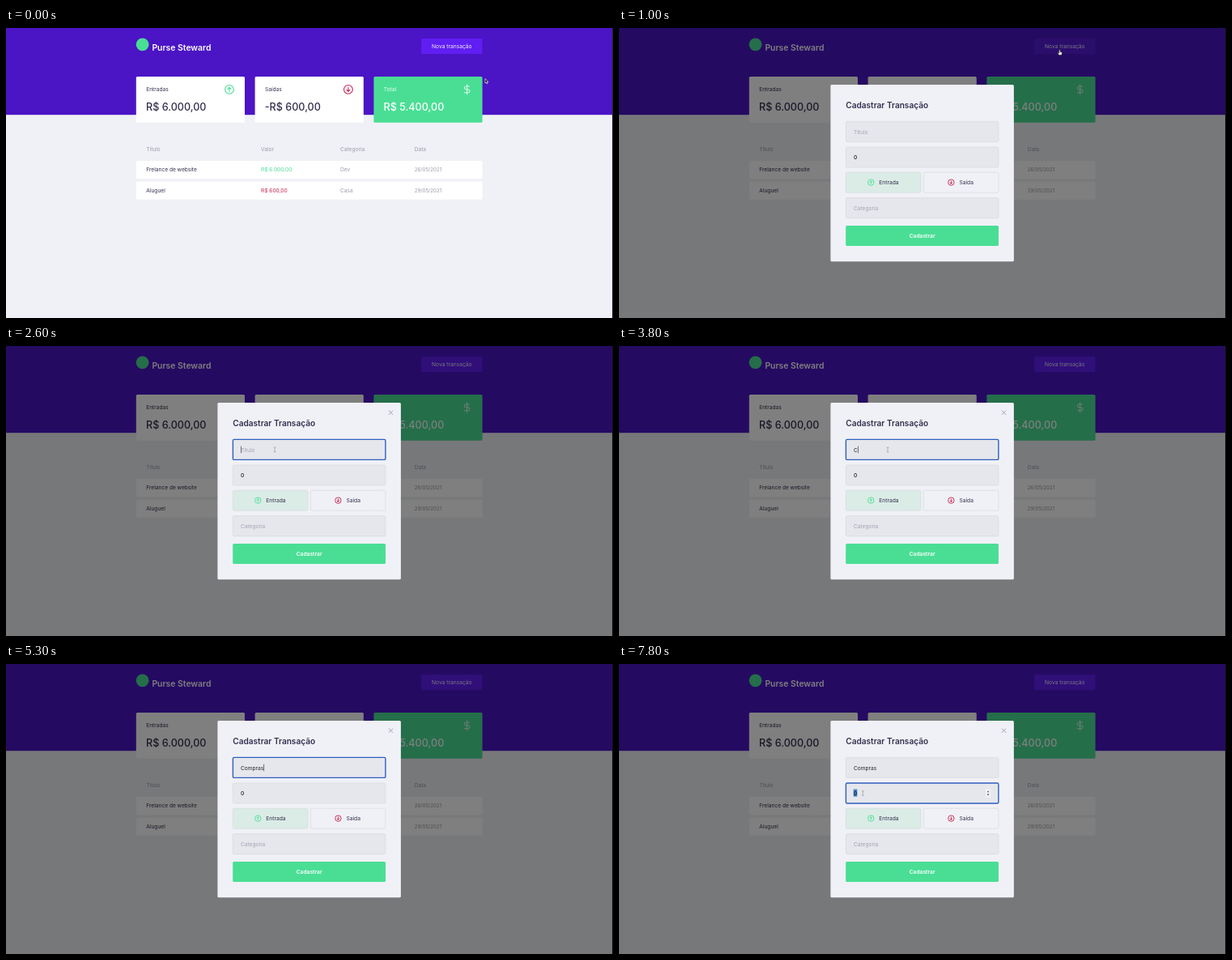
Animation of 750x358 px, one loop 8 s. Source, as an HTML page with a canvas:

```html
<!DOCTYPE html>
<html lang="pt-BR">
<head>
<meta charset="utf-8">
<title>Purse Steward</title>
<style>
  html, body { margin: 0; width: 100%; height: 100%; overflow: hidden; background: #f0f1f6; }
  canvas { display: block; width: 750px; height: 358px; }
</style>
</head>
<body>
<canvas id="stage"></canvas>
<script>
const W = 750, H = 358, LOOP = 8000, STEP = 100;
const C = {
  bg: '#f0f1f6', header: '#4b14c5', button: '#611ef2', hover: '#571bda',
  green: '#4ade95', red: '#c8214f', title: '#322f4f', body: '#9b9ba9',
  field: '#e6e7ec', line: '#d6d8dd', ink: '#23232b', focus: '#2f5fc0'
};
const canvas = document.getElementById('stage');
const ctx = canvas.getContext('2d');
const dpr = window.devicePixelRatio || 1;
canvas.width = W * dpr;
canvas.height = H * dpr;

function box(x, y, w, h, fill, r = 1.5, stroke, line = 0.7) {
  ctx.beginPath();
  ctx.roundRect(x, y, w, h, r);
  if (fill) { ctx.fillStyle = fill; ctx.fill(); }
  if (stroke) { ctx.strokeStyle = stroke; ctx.lineWidth = line; ctx.stroke(); }
}

function text(str, x, y, color, size = 6.6, weight = 400, align = 'left') {
  ctx.font = `${weight} ${size}px Inter, "Open Sans", sans-serif`;
  ctx.textAlign = align;
  ctx.fillStyle = color;
  ctx.fillText(str, x, y);
}

function textWidth(str, size = 6.6, weight = 400) {
  ctx.font = `${weight} ${size}px Inter, "Open Sans", sans-serif`;
  return ctx.measureText(str).width;
}

function path(d, x, y, scale, stroke, line, fill) {
  const p = new Path2D(d);
  ctx.save();
  ctx.translate(x, y);
  ctx.scale(scale, scale);
  ctx.lineCap = ctx.lineJoin = 'round';
  if (fill) { ctx.fillStyle = fill; ctx.fill(p); }
  if (stroke) { ctx.strokeStyle = stroke; ctx.lineWidth = line / scale; ctx.stroke(p); }
  ctx.restore();
}

// dir: -1 points up, 1 points down
function arrowIcon(x, y, r, dir, color, line) {
  ctx.beginPath();
  ctx.arc(x, y, r, 0, Math.PI * 2);
  ctx.strokeStyle = color;
  ctx.lineWidth = line;
  ctx.stroke();
  path(`M0 -5V5M-4 ${dir}L0 ${5 * dir}L4 ${dir}`, x, y, r / 11, color, line);
}

function card(x, label, value, fill, labelColor, valueColor) {
  box(x, 60, 134.2, 56.8, fill);
  text(label, x + 12.4, 78.3, labelColor);
  text(value, x + 12.2, 102.4, valueColor, 12.6, 500);
}

function row(y, name, value, color, category, date) {
  box(160.8, y, 427.8, 22.2, '#fff');
  const base = y + 13.3;
  text(name, 173.3, base, C.title);
  text(value, 315, base, color, 6.6);
  text(category, 413, base, C.body);
  text(date, 504.7, base, C.body, 6.2);
}

function page(hover) {
  ctx.fillStyle = C.bg;
  ctx.fillRect(0, 0, W, H);
  ctx.fillStyle = C.header;
  ctx.fillRect(0, 0, W, 107.2);

  ctx.beginPath();
  ctx.arc(168.6, 20.3, 7.9, 0, Math.PI * 2);
  ctx.fillStyle = C.green;
  ctx.fill();
  text('Purse Steward', 180.4, 28.4, '#fff', 10.4, 600);

  box(513.2, 13, 75.3, 18.9, hover ? C.hover : C.button);
  text('Nova transação', 550.8, 24.6, '#f3effc', 6.7, 400, 'center');

  card(160.8, 'Entradas', 'R$ 6.000,00', '#fff', C.title, C.title);
  arrowIcon(276, 75.9, 5.4, -1, C.green, 1.1);
  card(307.6, 'Saídas', '-R$ 600,00', '#fff', C.title, C.title);
  arrowIcon(422.9, 75.9, 5.4, 1, C.red, 1.1);
  card(454.4, 'Total', 'R$ 5.400,00', C.green, '#eafff3', '#fff');
  path('M0 -11V11M5 -7H-2.5A3.5 3.5 0 0 0 -2.5 0H2.5A3.5 3.5 0 0 1 2.5 7H-6', 569.7, 75.9, 0.55, '#f4fff9', 0.9);

  const heads = { 'Título': 173.3, 'Valor': 315, 'Categoria': 413, 'Data': 504.7 };
  for (const h in heads) text(h, heads[h], 151.8, C.body);
  row(164, 'Frelance de website', 'R$ 6.000,00', C.green, 'Dev', '26/05/2021');
  row(189.5, 'Aluguel', 'R$ 600,00', C.red, 'Casa', '29/05/2021');
  ctx.fillStyle = '#26242c';
  ctx.fillRect(749, 0, 1, H);
}

function field(y, value, placeholder, focused, weight) {
  box(280.4, y, 188.5, 25, C.field, 1.5, focused ? C.focus : C.line, focused ? 1.4 : 0.7);
  text(value || placeholder, 290, y + 15.1, value ? C.ink : '#a2a3b3', 6.6, weight);
}

function typeButton(x, label, dir, color, fill) {
  box(x, 178.2, 92.5, 25, fill, 1.5, C.line);
  arrowIcon(x + (dir < 0 ? 30.9 : 34), 190.6, 3.7, dir, color, 0.9);
  text(label, x + (dir < 0 ? 40.9 : 44), 193, C.title, 6.7);
}

function caret(x, y) {
  ctx.fillStyle = C.ink;
  ctx.fillRect(x, y - 4.2, 0.6, 8.6);
}

const typed = [[3700, 1], [4400, 2], [4600, 3], [4800, 4], [5100, 5], [5300, 7]];
const FOCUS = 2200, NEXT = 6900, SELECT = 7400;

function modal(t) {
  ctx.fillStyle = 'rgba(0,0,0,.5)';
  ctx.fillRect(0, 0, W, H);
  box(261.4, 69.9, 226.5, 218.3, C.bg);
  text('Cadastrar Transação', 280.2, 99.3, C.title, 10.1, 600);
  if (t >= 1100) path('M-2.4 -2.4L2.4 2.4M2.4 -2.4L-2.4 2.4', 475.5, 82.2, 1, '#92929f', 0.8);

  let chars = 0, since = FOCUS;
  for (const [at, n] of typed) if (t >= at) { chars = n; since = at; }
  const name = 'Compras'.slice(0, chars);
  const first = t >= FOCUS && t < NEXT, second = t >= NEXT;
  const blinkOn = from => Math.floor((t - from) / 550) % 2 === 0;

  field(115.4, name, 'Título', first);
  if (first && blinkOn(since)) caret(290 + textWidth(name) + 0.2, 127.9);

  field(147, '0', '', second, 500);
  if (t >= SELECT) {
    box(289.7, 154.6, 4.6, 9, '#3d7fc4', 0);
    text('0', 290, 162.1, '#16233f', 6.6, 500);
  } else if (second && blinkOn(NEXT)) {
    caret(293.8, 159.3);
  }
  if (t >= 6500) {
    box(453.2, 154.4, 5.8, 10, '#f4f4f6', 1);
    path('M-1.4 -1.2L0 -3L1.4 -1.2ZM-1.4 1.2L0 3L1.4 1.2Z', 456.1, 159.4, 1, null, 0, '#44444c');
  }

  typeButton(280.4, 'Entrada', -1, C.green, '#dbece6');
  typeButton(376.4, 'Saída', 1, C.red);
  field(209.7, '', 'Categoria', false);
  box(280.2, 244.1, 188.8, 25, C.green);
  text('Cadastrar', 374.6, 259.2, '#fff', 6.7, 600, 'center');
}

const route = [
  [0, 592, 63], [500, 544.4, 27], [1000, 544.4, 27], [1600, 437, 83.8], [1800, 360, 120],
  [2000, 332, 128], [5800, 332, 128], [6700, 312, 153], [7100, 301.3, 159.5], [LOOP, 301.3, 159.5]
];

function pointer(t) {
  const i = route.findIndex(k => k[0] > t);
  const [t0, x0, y0] = route[i - 1], [t1, x1, y1] = route[i];
  const u = (t - t0) / (t1 - t0), e = u * u * (3 - 2 * u);
  return { x: x0 + (x1 - x0) * e, y: y0 + (y1 - y0) * e };
}

function inside(p, x, y, w, h) {
  return p.x > x && p.x < x + w && p.y > y && p.y < y + h;
}

function cursor(t, p, overButton) {
  if (t >= 4600 && t < 5900) return;
  const overField = t >= 1000 && (inside(p, 280, 115, 189, 25.5) || inside(p, 280, 147, 189, 25));
  if (overField) {
    path('M-1 -3Q0 -3 0 -2.3V2.3Q0 3 -1 3M1 -3Q0 -3 0 -2.3M0 2.3Q0 3 1 3', p.x, p.y, 1, '#777983', 0.5);
  } else if (overButton) {
    path('M-.7 .3Q0 -.6 .7 .3V2.3L2.6 2.9Q3.2 3.2 3 4.2L2.4 6.4H-.7L-2.4 3.9Q-2.1 3 -1.2 3.6L-.7 4Z',
      p.x, p.y, 1, '#17131f', 0.6, '#fff');
  } else {
    path('M0 0V5L1.2 4L2 5.8L3 5.4L2.2 3.6H3.7Z', p.x, p.y, 1, '#fff', 0.6, '#111');
  }
}

function draw(now) {
  const t = Math.floor((now % LOOP) / STEP) * STEP;
  const p = pointer(t);
  const overButton = t <= 1000 && inside(p, 513, 13, 75.5, 19);
  ctx.setTransform(dpr, 0, 0, dpr, 0, 0);
  page(overButton);
  if (t >= 1000) modal(t);
  cursor(t, p, overButton);
}

let start;
function frame(now) {
  if (start === undefined) start = now;
  draw(now - start);
  requestAnimationFrame(frame);
}
draw(0);
requestAnimationFrame(frame);
</script>
</body>
</html>
```
